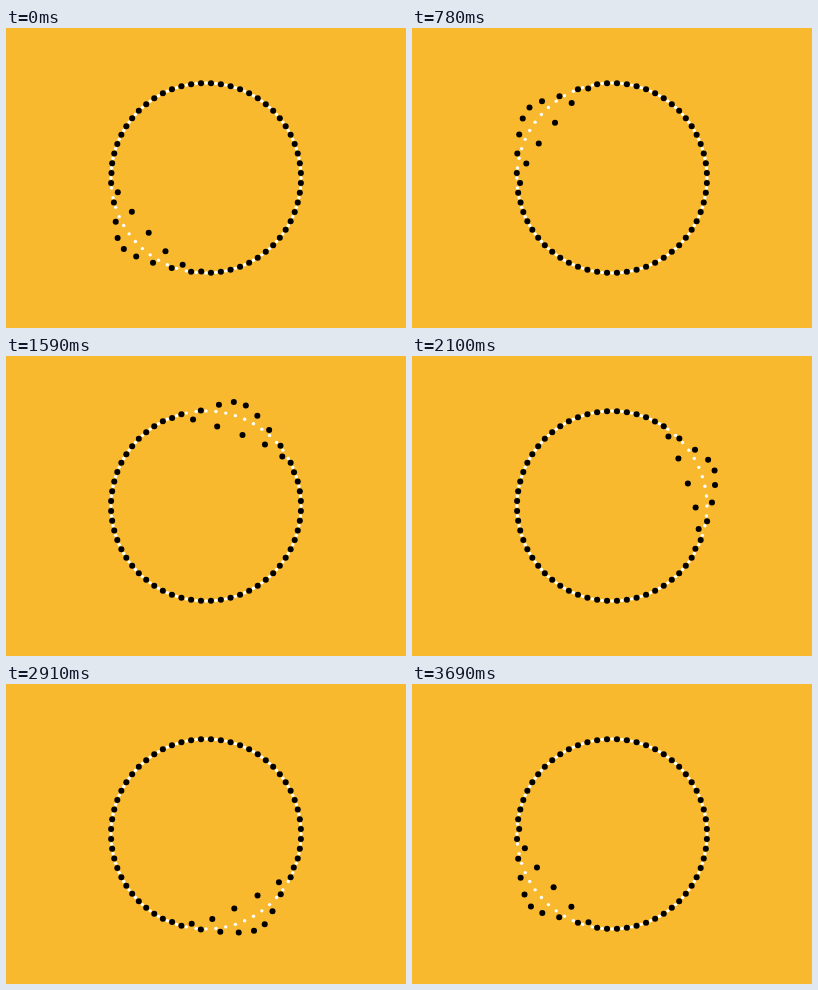
These frames come from a looping animation (400 by 300 pixels, 3.72 s). An HTML page:

```html
<!DOCTYPE html>
<html lang="en">
<head>
<meta charset="utf-8">
<title>Ring of swapping dots</title>
<style>
  html, body { margin: 0; width: 100%; height: 100%; overflow: hidden; background: #f9b92f; }
  svg { display: block; width: 400px; height: 300px; }
</style>
</head>
<body>
<svg id="stage" viewBox="0 0 400 300"></svg>
<script>
const LOOP = 3720, TICK = 30, STAGGER = 120, SWAP = 876;
const CX = 200, CY = 150, RADIUS = 95, PAIRS = 30, TOP = 15;
const RAD = Math.PI / 180;
const HALF = RADIUS * Math.sin(9 * RAD);  // half the chord between partners
const MID = RADIUS * Math.cos(9 * RAD);   // distance of its midpoint from the centre

const stage = document.getElementById('stage');

function addDot(r, fill) {
  const dot = document.createElementNS('http://www.w3.org/2000/svg', 'circle');
  dot.setAttribute('r', r);
  dot.setAttribute('fill', fill);
  stage.appendChild(dot);
  return dot;
}

function place(dot, x, y) {
  dot.setAttribute('cx', x.toFixed(2));
  dot.setAttribute('cy', y.toFixed(2));
}

// Cubic bezier easing with control points (x1, 0) and (x2, 1)
function bezier(x, x1, x2) {
  if (x <= 0) return 0;
  if (x >= 1) return 1;
  let lo = 0, hi = 1, s;
  for (let i = 0; i < 24; i++) {
    s = (lo + hi) / 2;
    const q = 1 - s;
    if (3 * x1 * s * q * q + 3 * x2 * s * s * q + s * s * s < x) lo = s;
    else hi = s;
  }
  return s * s * (3 - 2 * s);
}

const easeA = x => bezier(x, 0.275, 0.515);
const easeB = x => 1 - easeA(1 - x);

// Half-turn progress of the k-th swap; swaps past the top use the reversed ease
function progress(k, t) {
  return k < TOP
    ? easeA((t - (k - 7.3) * STAGGER) / SWAP)
    : easeB((t - (k - 7.52) * STAGGER) / SWAP);
}

for (let i = 0; i < 60; i++) {
  const a = i * 6 * RAD;
  place(addDot(1.7, '#fff'), CX - RADIUS * Math.sin(a), CY + RADIUS * Math.cos(a));
}

const pairs = Array.from({ length: PAIRS }, (_, k) => ({
  k,
  angle: k * 12 * RAD,  // clockwise from the bottom
  dots: [addDot(3, '#000'), addDot(3, '#000')]
}));

function draw(t) {
  for (const { k, angle, dots } of pairs) {
    // The early pairs swap again as the wave comes round
    const turn = Math.PI * (progress(k, t) + (k < TOP ? progress(k + PAIRS, t) : 0));
    const sin = Math.sin(angle), cos = Math.cos(angle);
    const along = -HALF * Math.cos(turn), out = HALF * Math.sin(turn);
    const dx = -sin * out - cos * along;
    const dy = cos * out - sin * along;
    const mx = CX - MID * sin, my = CY + MID * cos;
    place(dots[0], mx + dx, my + dy);
    place(dots[1], mx - dx, my - dy);
  }
}

const start = performance.now();
function frame() {
  const t = (performance.now() - start) % LOOP;
  draw(Math.floor(t / TICK) * TICK);
  requestAnimationFrame(frame);
}
frame();
</script>
</body>
</html>
```
